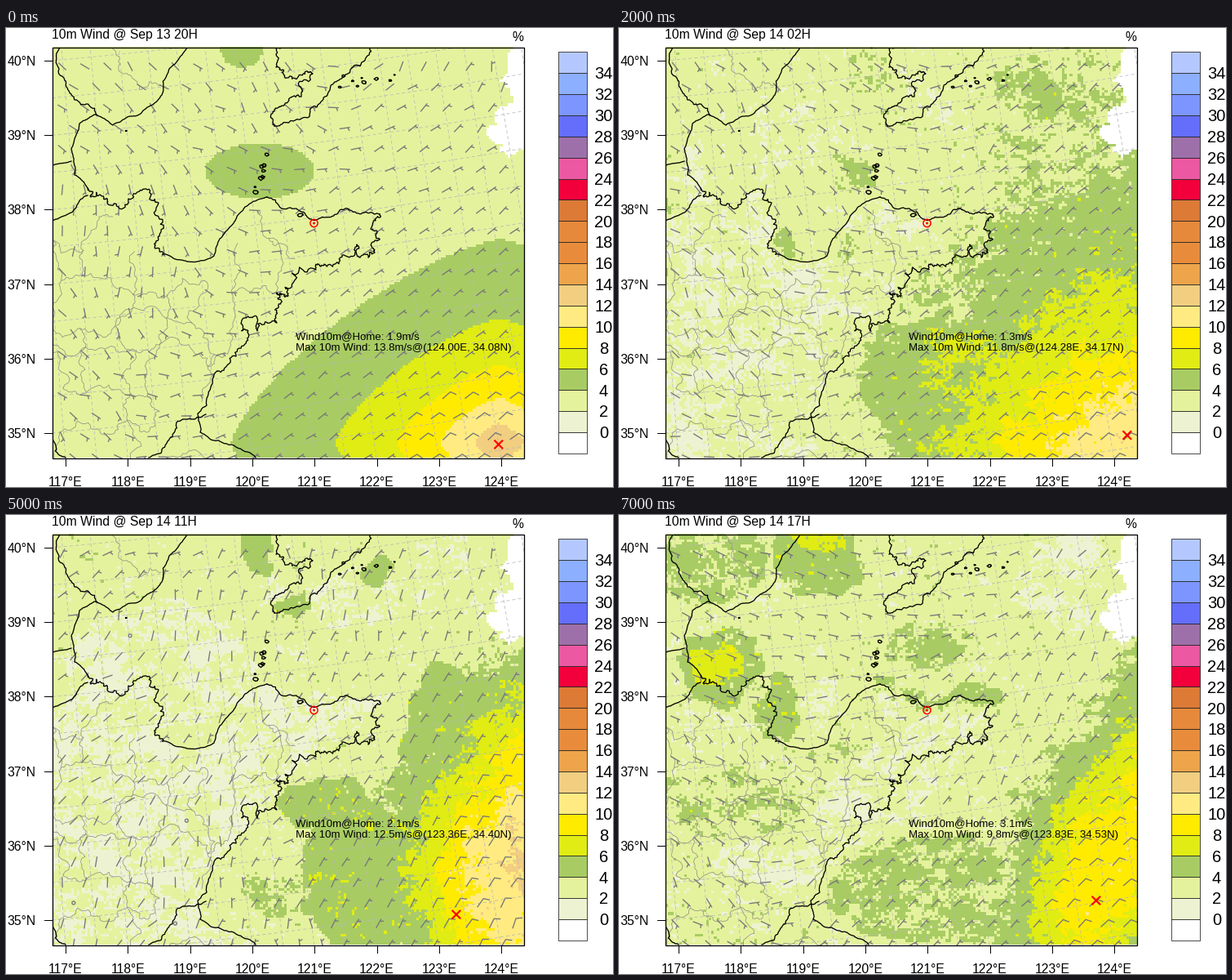
Animation, 744 px wide and 562 px high, one loop 8000 ms. Source, as a matplotlib script:

```python
import numpy as np
import matplotlib.pyplot as plt
from matplotlib.animation import FuncAnimation
from matplotlib.collections import LineCollection
from matplotlib.colors import ListedColormap
from matplotlib.patches import Circle, Rectangle
from matplotlib.path import Path

W, H, DPI = 744, 562, 100
L, R, T, B = 56.5, 634.5, 24, 526.5
NX, NY = 175, 152
PT = 72 / DPI

COLORS = ["#ffffff", "#edf3d2", "#e5f29d", "#a8cc63", "#e0ec14", "#ffeb00",
          "#ffeb82", "#f2ce80", "#eea44a", "#e88c3c", "#e6893a", "#dc7a36",
          "#f3003c", "#ec58a2", "#9e70aa", "#646efa", "#7d96ff", "#8cafff",
          "#b4c8ff"]

plt.rcParams["font.family"] = "Liberation Sans"
fig = plt.figure(figsize=(W / DPI, H / DPI), dpi=DPI, facecolor="white")
ax = fig.add_axes([0, 0, 1, 1])
ax.axis("off")
frame = Rectangle((L, T), R - L, B - T, fill=False, lw=1.3 * PT, zorder=9)
ax.add_patch(frame)


def label(x, y, s, px=15.8, ha="left", **kw):
    return ax.text(x, y, s, fontsize=px * PT, ha=ha, va="baseline", **kw)


def stroke(x, y, color="black", px=1.0, clip=True, **kw):
    ln, = ax.plot(x, y, color=color, lw=px * PT, **kw)
    if clip:
        ln.set_clip_path(frame)
    return ln


# ---- coastline: key points roughened by midpoint displacement ----

shapes = np.random.default_rng(8)


def ragged(xy, amount, depth=4):
    p = np.array(xy, float).reshape(-1, 2)
    for _ in range(depth):
        d = np.diff(p, axis=0)
        push = shapes.uniform(-amount, amount, (len(d), 1))
        out = np.empty((2 * len(p) - 1, 2))
        out[::2] = p
        out[1::2] = p[:-1] + d / 2 + push * np.column_stack([-d[:, 1], d[:, 0]])
        p = out
    return p


def coast(amount, *xy):
    p = ragged(xy, amount)
    stroke(*p.T, px=1.3, zorder=6)
    return p


# western gulf, then the southern land from the delta to the south shore
coast(.1, 222, 24, 200, 50, 191, 82, 165, 105, 131, 119, 108, 106, 90, 117,
      80, 148, 84, 180, 100, 196)
delta = coast(.4, 100, 196, 104, 207, 118, 206, 124, 214, 150, 209, 173, 198,
              187, 214, 188, 255, 183, 270, 192, 277)
bay = coast(.1, 192, 277, 222, 286, 255, 279, 262, 258, 281, 236, 293, 219, 320, 207)
north = coast(.2, 320, 207, 356, 221, 374, 234, 405, 228, 416, 221, 432, 227, 458, 228)
cape = coast(.48, 458, 228, 450, 238, 455, 250, 450, 262, 452, 275, 434, 281, 430, 265,
             412, 278, 390, 289, 380, 296, 352, 312, 346, 328, 332, 324, 330, 345)
south = coast(.35, 330, 345, 332, 361, 308, 371, 304, 353, 288, 362, 297, 374,
              282, 402, 259, 420)
strand = coast(.12, 259, 420, 246, 462, 235, 472, 238, 495, 262, 506, 306, 526)
# north-eastern peninsula
coast(.42, 338, 24, 331, 48, 344, 61, 368, 53, 376, 56, 362, 84, 338, 95, 327, 102, 329, 120)
coast(.25, 329, 120, 352, 114, 385, 92, 403, 66, 425, 48, 446, 24)
# borders
coast(.2, 66, 24, 72, 64, 84, 88, 112, 107)
coast(.1, 57, 168, 80, 163)
coast(.15, 57, 236, 80, 226, 100, 205)
coast(.2, 175, 526, 198, 506, 215, 480, 245, 473)
coast(.2, 57, 503, 73, 526)

land_edge = Path(np.vstack([[(0, 600), (0, 236), (57, 236)], delta, bay, north, cape,
                            south, strand, [(306, 600)]]))


def islands(n, x0, y0, x1, y1, spread):
    for u in np.linspace(0, 1, n):
        x, y = shapes.normal((x0 + u * (x1 - x0), y0 + u * (y1 - y0)), spread)
        ring = np.linspace(0, 2 * np.pi, 9)
        r = shapes.uniform(.5, 2.6) * shapes.uniform(.6, 1.1, 9)
        stroke(x + 1.4 * r * np.cos(ring), y + r * np.sin(ring), px=1.4, zorder=6)


islands(8, 318, 157, 308, 201, 2.5)
islands(9, 409, 68, 467, 64, 5)
islands(2, 147, 126, 361, 229, 0)


def counties(step=44):
    """A loose net of boundaries over the southern land."""
    nodes = {(i, j): (57 + step * i, 268 + step * j) + shapes.uniform(-15, 15, 2)
             for i in range(10) for j in range(-1, 7)}
    for (i, j), p in nodes.items():
        for key in ((i + 1, j), (i, j + 1)):
            q = nodes.get(key)
            if q is None or shapes.random() < .2:
                continue
            line = ragged([p, q], .3)
            if land_edge.contains_points(line).all():
                stroke(*line.T, color="#8f8f83", px=.75, zorder=3)


counties()
stroke(*ragged((130, 24, 138, 52, 163, 75, 190, 70), .25).T, color="#8f8f83", px=.75, zorder=3)

# ---- wind speed fields, in units of one 2 m/s colour band ----

gx, gy = np.meshgrid(L + (np.arange(NX) + .5) * (R - L) / NX,
                     T + (np.arange(NY) + .5) * (B - T) / NY)
cells = np.column_stack([gx.ravel(), gy.ravel()])
on_land = land_edge.contains_points(cells).reshape(NY, NX)


def noise(rng, sx, sy=None):
    """Smooth random field with features about sx by sy cells in size."""
    sy = sy or sx
    c = rng.normal(size=(NY // sy + 2, NX // sx + 2))
    ys, xs = np.arange(NY) / sy, np.arange(NX) / sx
    c = np.array([np.interp(xs, np.arange(c.shape[1]), r) for r in c])
    return np.array([np.interp(ys, np.arange(c.shape[0]), r) for r in c.T]).T


def near(shore):
    d = cells[:, None] - shore[None, ::3]
    return np.sqrt((d ** 2).sum(-1).min(1)).reshape(NY, NX)


class Wind:
    def __init__(self, seed, rough):
        self.rng = np.random.default_rng(seed)
        self.rough = rough
        self.f = np.full((NY, NX), 1.5 - .08 * rough)
        self.x = gx + rough * (6 * noise(self.rng, 8) + 3 * noise(self.rng, 3))
        self.y = gy + rough * (6 * noise(self.rng, 8) + 3 * noise(self.rng, 3))

    def radius(self, x, y, rx, ry, tilt, p=2.0):
        a = np.radians(tilt)
        dx, dy = self.x - x, y - self.y
        u = np.abs(dx * np.cos(a) + dy * np.sin(a)) / rx
        v = np.abs(dy * np.cos(a) - dx * np.sin(a)) / ry
        return (u ** p + v ** p) ** (1 / p)

    def land(self, level):
        self.f[on_land] = level
        return self

    def blob(self, level, x, y, rx, ry, tilt=0):
        self.f[self.radius(x, y, rx, ry, tilt) < 1] = level
        return self

    def shore(self, level, line, width):
        self.f[near(line) + self.y - gy < width] = level
        return self

    def storm(self, top, x, y, rx, ry, tilt=0, sharp=2):
        r = self.radius(x, y, rx, ry, tilt, 1.35)
        self.f = np.maximum(self.f, 1 + (top - 1) * np.exp(-r ** sharp))
        return self

    def speckle(self):
        n = self.rng
        grain = .14 * noise(n, 1) + .2 * noise(n, 3, 2) + .17 * noise(n, 9, 6)
        return self.rough * grain * np.where(on_land, 1.3, 1)


winds = {
    0: Wind(1, 0).blob(.5, 130, 425, 185, 92, 12).blob(.5, 340, 302, 150, 55, 32)
    .blob(1.5, 185, 500, 50, 56).blob(.5, 60, 240, 40, 75).blob(.5, 140, 50, 80, 42, 8)
    .blob(.5, 475, 50, 78, 62).blob(.5, 608, 145, 38, 50).blob(2.5, 311, 176, 67, 34)
    .blob(2.5, 288, 24, 26, 26).storm(6.9, 604, 508, 185, 140, 0, 1),
    1: Wind(2, 1).land(.98).blob(.5, 90, 160, 16, 50).blob(.6, 450, 115, 100, 38, -20)
    .blob(.6, 570, 170, 55, 80).blob(2.2, 288, 184, 34, 16).blob(2.6, 200, 262, 15, 20)
    .blob(2.0, 285, 265, 42, 12, 62).blob(2.5, 385, 430, 90, 75)
    .blob(2.9, 386, 403, 20, 30).blob(3.2, 410, 512, 50, 18)
    .storm(6.4, 640, 540, 235, 160),
    3: Wind(3, 1).land(.98).blob(.8, 200, 115, 50, 55).blob(.7, 385, 205, 55, 20)
    .blob(2.4, 310, 55, 33, 35).blob(2.0, 275, 170, 35, 18).blob(2.4, 500, 95, 75, 58)
    .blob(3.4, 511, 92, 25, 34).blob(2.2, 330, 400, 95, 35, 40)
    .storm(5.2, 600, 455, 250, 350),
    5: Wind(4, 1).land(1).blob(.75, 190, 185, 115, 75).blob(.8, 550, 80, 60, 58)
    .blob(.9, 430, 105, 60, 36).blob(2.4, 305, 42, 22, 32).blob(2.5, 348, 107, 25, 14)
    .blob(2.5, 453, 70, 18, 14).blob(2.5, 540, 270, 55, 90).blob(2.6, 425, 440, 70, 95)
    .blob(2.5, 390, 355, 60, 28).blob(2, 330, 465, 45, 25)
    .storm(6, 640, 440, 165, 230),
    6: Wind(5, 1).land(1.4).blob(.8, 250, 160, 170, 48).blob(.8, 240, 235, 30, 55)
    .blob(.8, 550, 85, 70, 60).blob(.7, 370, 310, 110, 40, 30).blob(.8, 160, 430, 120, 30, 10)
    .blob(2.1, 245, 50, 60, 50).blob(2.2, 350, 105, 28, 18, 30).blob(2, 150, 385, 95, 16, 12)
    .blob(2.3, 390, 375, 95, 24, 12).blob(2.2, 278, 440, 50, 16, 58)
    .blob(2.2, 534, 230, 24, 25).blob(2.3, 450, 480, 75, 60, 40)
    .shore(2.5, delta, 20).shore(3.3, delta, 8).shore(2.4, north, 13)
    .storm(5.2, 640, 420, 330, 112, 65),
    7: Wind(6, 1).land(1.45).blob(2.1, 110, 60, 75, 45).blob(2.4, 245, 55, 50, 55)
    .blob(3.2, 245, 28, 35, 16).blob(2.4, 125, 185, 50, 48).blob(3.4, 122, 187, 33, 24)
    .blob(2.5, 198, 240, 22, 45).blob(1.95, 380, 165, 65, 30).blob(1.95, 130, 350, 95, 45)
    .blob(.7, 550, 85, 65, 62).blob(.9, 255, 235, 25, 38).blob(.7, 330, 330, 120, 48, 38)
    .blob(.8, 190, 425, 75, 25).blob(2.05, 385, 460, 130, 65).shore(2.2, north, 13)
    .storm(4.7, 600, 430, 300, 105, 70),
}
known = {k: w.f for k, w in winds.items()}
grain = {k: w.speckle() for k, w in winds.items()}

# home speed, top speed, and its longitude and latitude
peaks = {0: (1.9, 13.8, 124.00, 34.08), 1: (1.8, 12.0, 124.18, 33.97),
         3: (0.8, 11.6, 124.37, 34.37), 5: (2.1, 12.5, 123.36, 34.40),
         6: (4.5, 11.3, 124.63, 35.11), 7: (3.1, 9.8, 123.83, 34.53)}
for k in (2, 4):
    for d in (known, peaks):
        d[k] = (np.array(d[k - 1]) + np.array(d[k + 1])) / 2
    grain[k] = grain[k + 1]

edge = Path([(624, 10), (613, 48), (614, 78), (624, 90), (602, 102), (589, 130),
             (600, 148), (618, 158), (650, 142), (650, 10), (624, 10)])
warp = np.random.default_rng(3)
shaken = cells + 3.5 * np.column_stack([noise(warp, 2).ravel(), noise(warp, 2).ravel()])
no_data = edge.contains_points(shaken).reshape(NY, NX)

images = []
for k in range(8):
    band = np.clip(np.floor(known[k] + grain[k]), 0, 6) + 1
    band[no_data] = 0
    images.append(band)

# ---- wind barbs ----

west = (-45, -32, -42, -58, 0, 55, 30, -25)
east = (38, 42, 42, 48, 55, 60, 62, 45)


def shaft_angle(k, x, y):
    """Inland direction turns into the steady sea wind from north-west to south-east."""
    s = np.clip((x - 150 + .5 * (y - 270)) / 300, 0, 1)
    s = s * s * (3 - 2 * s)
    corner = max(0, (x - 450) / 184) * max(0, (200 - y) / 176)
    return west[k] + (east[k] - west[k]) * s + 35 * corner * (k < 2)


def barb(x, y, a, speed):
    u = np.array([np.cos(a), -np.sin(a)])
    v = np.array([np.cos(a - 1.15), -np.sin(a - 1.15)])
    c = np.array([x, y])
    tip, end = c - 6.5 * u, c + 6.5 * u
    if speed < 2.4:
        return [[tip, end]]
    if speed < 7.5:
        root = end - 3 * u
        return [[tip, end], [root, root + 4.5 * v]]
    return [[tip, end, end + 8 * v]]


def all_barbs(k):
    rng = np.random.default_rng(50 + k)
    ring = np.linspace(0, 2 * np.pi, 13)
    turn = noise(rng, 30)
    segs = []
    for j in range(20):
        y = 48.3 + 25.17 * (j - .05)
        for x in np.arange(69 + 13.85 * (j % 2), R - 4, 27.7):
            wobble, chance = rng.normal(), rng.random()
            col = min(int((x - L) / (R - L) * NX), NX - 1)
            row = min(int((y - T) / (B - T) * NY), NY - 1)
            if no_data[row, col]:
                continue
            speed = 2 * known[k][row, col]
            light = speed < 3.2
            if speed < 2.2 and chance < .04:
                segs.append(np.column_stack([x + 2 * np.cos(ring), y + 2 * np.sin(ring)]))
                continue
            a = shaft_angle(k, x, y) + light * 22 * turn[row, col] + (12 if light else 4) * wobble
            segs += barb(x, y, np.radians(a), speed)
    return segs


barbs = [all_barbs(k) for k in range(8)]

# ---- projection and tilted graticule ----


def rise(x):
    d = x - L
    return .09 * d + .04 / (R - L) * d ** 2


def foot(lon):
    return 73 + 76.2 * (lon - 117)


def lean(lon):
    return .08 + .0115 * (lon - 117)


def project(lon, lat):
    x = foot(lon)
    for _ in range(4):
        y = 40 + 91.2 * (40 - lat) - rise(x)
        x = foot(lon) - lean(lon) * (B - y)
    return x, y


def grid_line(x, y):
    stroke(x, y, color="#b9b9b9", px=.8, dashes=(5, 4), zorder=4)


xs = np.linspace(L, R, 40)
for lat in np.arange(33.5, 41, .5):
    grid_line(xs, 40 + 91.2 * (40 - lat) - rise(xs))
for lon in np.arange(117, 126, .5):
    grid_line([foot(lon), foot(lon) - lean(lon) * (B - T)], [B, T])

# ---- ticks, colour bar, fixed marks ----

for i in range(6):
    y = 40 + 91.2 * i
    stroke([47, L], [y, y], clip=False)
    label(36.8, y + 6, f"{40 - i}°N", ha="right")
for i in range(8):
    x = 73 + 76.3 * i
    stroke([x, x], [B, 536], clip=False)
    label(x, 561, f"{117 + i}°E", ha="center")

step = 25.88
for i, color in enumerate(COLORS):
    y = 521 - step * (i + 1)
    ax.add_patch(Rectangle((676.5, y), 35, step, fc=color, ec="#222222", lw=.8 * PT))
    if i < 18:
        label(732.5, y + 7.2, str(2 * i), px=20.2, ha="center")

label(634.5, 16.5, "%", ha="right")
ax.add_patch(Circle((377.5, 239), 4.6, fill=False, ec="red", lw=1.5 * PT, zorder=8))
ax.add_patch(Circle((377.5, 239), 1.4, fc="red", lw=0, zorder=8))

field = ax.imshow(images[0], cmap=ListedColormap(COLORS[:8]), vmin=-.5, vmax=7.5,
                  extent=(L, R, B, T), interpolation="nearest", aspect="auto", zorder=1)
ax.set_xlim(0, W)
ax.set_ylim(H, 0)
flags = LineCollection([], colors="#787878", linewidths=1.35 * PT, zorder=5)
ax.add_collection(flags)
flags.set_clip_path(frame)
cross = [stroke([], [], color="red", px=2.2, zorder=8) for _ in range(2)]
title = label(55.5, 12.5, "")
home = label(355, 381, "", px=13.2, zorder=8)
top = label(355, 395.5, "", px=13.2, zorder=8)


def draw(k):
    field.set_data(images[k])
    flags.set_segments(barbs[k])
    here, peak, lon, lat = peaks[k]
    x, y = project(lon, lat)
    for ln, s in zip(cross, (1, -1)):
        ln.set_data([x - 4.5, x + 4.5], [y - 4.5 * s, y + 4.5 * s])
    hour = 20 + 3 * k
    title.set_text(f"10m Wind @ Sep {13 + hour // 24} {hour % 24:02d}H")
    home.set_text(f"Wind10m@Home: {here:.1f}m/s")
    top.set_text(f"Max 10m Wind: {peak:.1f}m/s@({lon:.2f}E, {lat:.2f}N)")
    return [field, flags, *cross, title, home, top]


anim = FuncAnimation(fig, draw, frames=8, interval=1000, repeat=True, repeat_delay=0)
plt.show()
```
